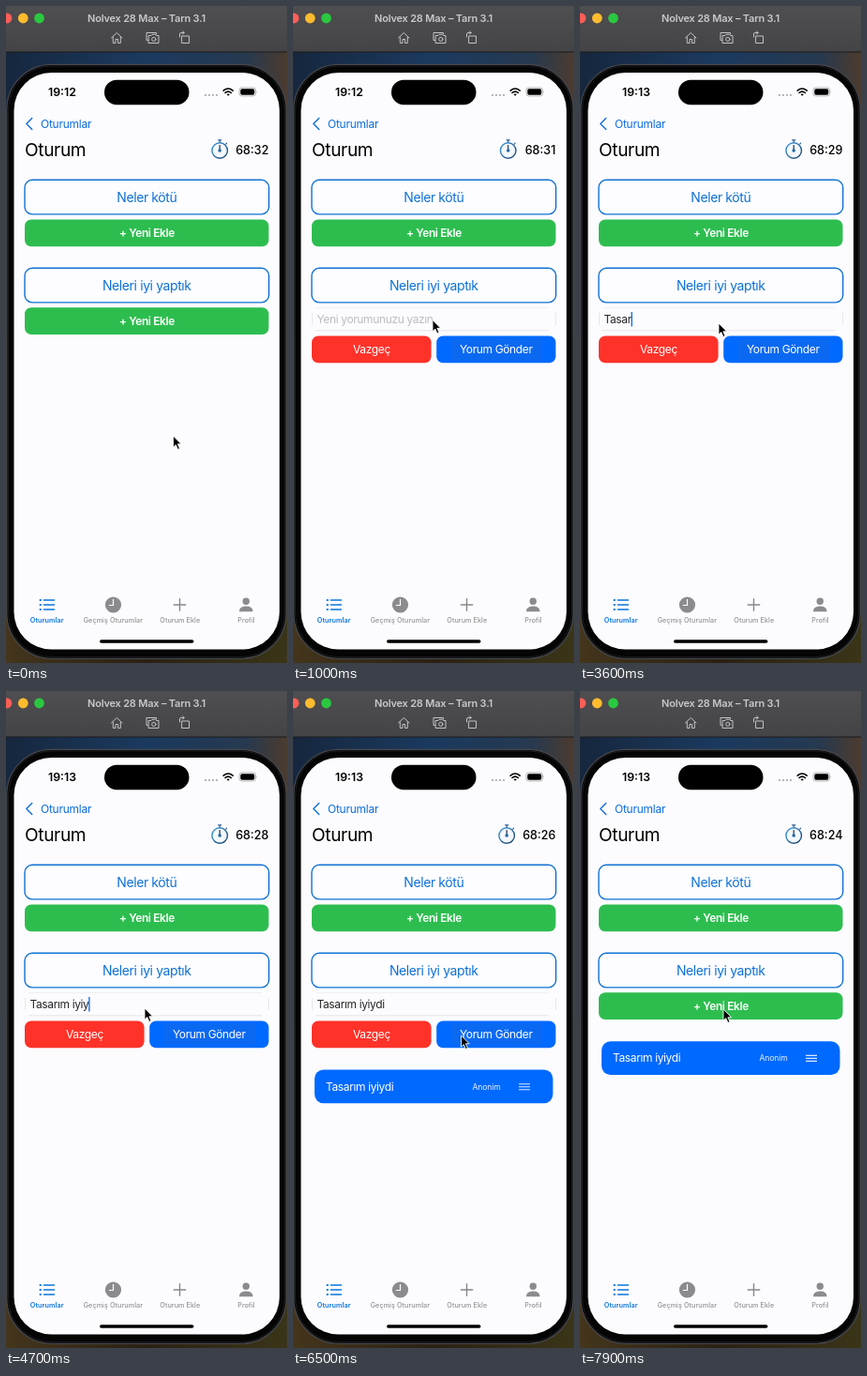
Write an HTML page that moves like this. It is 300 px wide and 700 px high and loops after 8000 ms.

```html
<!DOCTYPE html>
<html lang="tr">
<head>
<meta charset="utf-8">
<title>Oturum</title>
<style>
html, body { margin: 0; width: 100%; height: 100%; overflow: hidden; background: #0b1524; }
svg { display: block; width: 300px; height: 700px; }
text { font-family: Inter, Roboto, sans-serif; white-space: pre; }
.mid { text-anchor: middle; }
.body { font-size: 12px; letter-spacing: -.37px; }
.head { font-size: 14px; letter-spacing: -.4px; fill: #0d70d6; }
.add { font-size: 11.9px; font-weight: 600; letter-spacing: -.35px; fill: #fff; }
.tab { font-size: 7.2px; font-weight: 500; letter-spacing: .08px; fill: #929295; }
.line { fill: none; stroke-linecap: round; stroke-linejoin: round; }
</style>
</head>
<body>
<svg viewBox="0 0 300 700">
  <defs>
    <linearGradient id="bar" x2="0" y2="1">
      <stop offset="0" stop-color="#4f4e50"/>
      <stop offset="1" stop-color="#444346"/>
    </linearGradient>
    <linearGradient id="sky">
      <stop offset="0" stop-color="#16273e"/>
      <stop offset=".5" stop-color="#1b3a60"/>
      <stop offset=".85" stop-color="#26394f"/>
      <stop offset="1" stop-color="#4c3b2f"/>
    </linearGradient>
    <linearGradient id="ground">
      <stop offset="0" stop-color="#44351c"/>
      <stop offset=".5" stop-color="#2a2114"/>
      <stop offset="1" stop-color="#3a3518"/>
    </linearGradient>
    <linearGradient id="dial" x2="1" y2="1">
      <stop offset="0" stop-color="#3f9be0"/>
      <stop offset="1" stop-color="#173f66"/>
    </linearGradient>
    <g id="section">
      <rect x="20" y="185.3" width="260.7" height="36.6" rx="8" fill="#fdfdff" stroke="#1272d3" stroke-width="1.4"/>
    </g>
    <g id="add">
      <rect x="20" y="227.5" width="260.5" height="28.7" rx="7" fill="#2dbd4f"/>
      <text class="add mid" x="150.5" y="246.2">+ Yeni Ekle</text>
    </g>
  </defs>

  <rect width="300" height="350" fill="url(#sky)"/>
  <rect y="350" width="300" height="350" fill="url(#ground)"/>

  <!-- window bar -->
  <rect width="300" height="49" fill="url(#bar)"/>
  <rect y="48.5" width="300" height="1" fill="#1a1a1d"/>
  <circle cx="1" cy="13" r="5.4" fill="#fe5f57"/>
  <circle cx="18.3" cy="13" r="5.4" fill="#febb2e"/>
  <circle cx="35.5" cy="13" r="5.4" fill="#2ac840"/>
  <text class="mid" x="150" y="17" font-size="11" font-weight="600" letter-spacing="-.2" fill="#c9c8cb">Nolvex 28 Max – Tarn 3.1</text>
  <g class="line" stroke="#c2c1c4" stroke-width="1">
    <path d="M112.5 34L118.3 28.5L124 34M114.3 33V39.5H117V35.5H119.6V39.5H122.3V33"/>
    <path d="M151.5 36.5H150V28.5H160.5V30"/>
    <path d="M152.5 31.5H155L156 30.3H159.5L160.5 31.5H163V39.5H152.5Z"/>
    <circle cx="157.8" cy="35.4" r="2.1"/>
    <path d="M188 32H195.5V39.5H188ZM185.5 33V30Q185.5 28.5 187 28.5H190M188.5 26.8L190.2 28.5L188.5 30.2"/>
  </g>

  <!-- device -->
  <rect x=".8" y="62.3" width="298.4" height="633" rx="48" fill="#050506" stroke="#46474b" stroke-width="1.3"/>
  <rect x="2.6" y="64" width="294.8" height="629.6" rx="46" fill="none" stroke="#1c1c1f"/>
  <rect x="8.5" y="71" width="283.5" height="614.6" rx="40" fill="#fcfcff"/>
  <rect x="105" y="78.7" width="90.5" height="26.5" rx="13.2"/>
  <text id="clock" x="45" y="96" font-size="12.3" font-weight="600"></text>
  <g fill="#a5a5a8">
    <circle cx="213" cy="95" r="1.1"/><circle cx="217" cy="95" r="1.1"/>
    <circle cx="221" cy="95" r="1.1"/><circle cx="225" cy="95" r="1.1"/>
  </g>
  <path class="line" d="M232.2 90.2Q237.2 85.8 242.2 90.2M234 92.5Q237.2 89.8 240.4 92.5" stroke="#000" stroke-width="1.6"/>
  <path d="M235.5 94.1Q237.2 92.8 238.9 94.1L237.2 95.8Z"/>
  <rect x="249" y="87" width="17.6" height="9" rx="2.8" fill="none" stroke="#a2a2a5" stroke-width=".8"/>
  <rect x="250.3" y="88.3" width="15" height="6.4" rx="1.7"/>
  <path d="M267.6 90V93Q268.8 91.5 267.6 90Z" fill="#a2a2a5"/>

  <!-- navigation -->
  <path class="line" d="M27.8 119.5L21.8 125.5L27.8 131.5" stroke="#0a6cdc" stroke-width="1.3"/>
  <text x="37" y="130" font-size="12" letter-spacing="-.25" fill="#0a6cdc">Oturumlar</text>
  <text x="20" y="160.3" font-size="19.2" letter-spacing="-.4">Oturum</text>
  <g id="watch">
    <g class="line">
      <circle cx="228.2" cy="154" r="8.3" fill="#f3f8fd" stroke="url(#dial)" stroke-width="1.4"/>
      <path d="M228.2 145V143M226.6 142.8H229.8M234.8 147L235.6 146.2" stroke="#2a5f8f" stroke-width="1.2"/>
      <path d="M228.2 153.5V148.5" stroke="#1d3146" stroke-width="1.2"/>
    </g>
    <circle cx="228.2" cy="154" r="1.8" fill="#2469a3"/>
  </g>
  <text id="timer" x="280.5" y="157.6" font-size="12.6" font-weight="500" text-anchor="end"></text>

  <!-- sections -->
  <use href="#section"/>
  <text class="head mid" x="150.3" y="209">Neler kötü</text>
  <use href="#add"/>
  <use href="#section" y="94"/>
  <text class="head mid" x="150.3" y="303">Neleri iyi yaptık</text>
  <use id="closed" href="#add" y="93.8"/>

  <g id="editor">
    <path d="M24 321.5H273" stroke="#f0f0f3"/>
    <path d="M24 345.8H273" stroke="#e5e5e8"/>
    <path d="M20.5 327V340M280.5 327V340" stroke="#e8e8eb"/>
    <text id="hint" class="body" x="25.5" y="338.2" fill="#bcbcc0">Yeni yorumunuzu yazın</text>
    <text id="typed" class="body" x="25.5" y="338.2" fill="#252527"></text>
    <rect id="caret" y="326" width="1.4" height="15.5" fill="#1a73e0"/>
    <rect x="20" y="351.5" width="127.6" height="28.7" rx="7" fill="#ff3229"/>
    <rect x="153.2" y="351.5" width="127.3" height="28.7" rx="7" fill="#0069ff"/>
    <rect x="169" y="354.5" width="97" height="23" rx="2" fill="#0b69f1"/>
    <text class="body mid" x="84" y="370.2" fill="#fff">Vazgeç</text>
    <text class="body mid" x="216.8" y="370.2" fill="#fff">Yorum Gönder</text>
  </g>

  <g id="card">
    <rect x="23" width="254.5" height="35.8" rx="9.5" fill="#0069ff"/>
    <text class="body" x="35" y="22.3" fill="#fff">Tasarım iyiydi</text>
    <text x="191.5" y="21" font-size="8.6" letter-spacing="-.1" fill="#eaf2ff">Anonim</text>
    <path d="M241 15.2H253M241 18.2H253M241 21.2H253" stroke="#d9e8ff" stroke-width="1.1"/>
  </g>

  <!-- tabs -->
  <g stroke="#0a76dc" stroke-width="1.5" class="line">
    <path d="M40.5 633H51.5M40.5 638H51.5M40.5 643H51.5"/>
    <path d="M36.5 633H37M36.5 638H37M36.5 643H37" stroke-width="2"/>
  </g>
  <circle cx="114.5" cy="638" r="8.6" fill="#8b8b8e"/>
  <path class="line" d="M114.5 632.3V638.5H110.3" stroke="#fcfcff" stroke-width="1.2"/>
  <path class="line" d="M179.3 638H191.7M185.5 631.8V644.2" stroke="#87878a" stroke-width="1.4"/>
  <circle cx="256.3" cy="634.2" r="3.7" fill="#8b8b8e"/>
  <path d="M249 645.3Q249 639.4 256.3 639.4T263.6 645.3Z" fill="#8b8b8e"/>
  <text class="tab mid" x="43.7" y="656.7" style="fill:#0a76dc;font-weight:600">Oturumlar</text>
  <text class="tab mid" x="114.4" y="656.7">Geçmiş Oturumlar</text>
  <text class="tab mid" x="185.8" y="656.7">Oturum Ekle</text>
  <text class="tab mid" x="256.5" y="656.7">Profil</text>
  <rect x="100" y="675.2" width="100.5" height="3.6" rx="1.8"/>

  <path id="pointer" d="M0 0V12.2L2.8 9.6L4.9 14.4L7 13.5L4.9 8.8H8.7Z" fill="#000" stroke="#fff" stroke-width=".9" stroke-linejoin="round"/>
</svg>
<script>
const LOOP = 8000, STEP = 100;
const OPEN = 800, FOCUS = 1800, MINUTE = 2900, SEND = 6100, CLOSE = 7300;
const TYPE_START = 3000, TYPE_GAP = 150;
const COMMENT = "Tasarım iyiydi";
// time, x, y
const PATH = [
  [0, 178.5, 458], [200, 178.5, 458], [700, 150, 335], [1000, 149, 334.5],
  [1500, 148, 338], [5300, 148, 338], [5800, 179.5, 367], [6600, 179.5, 367],
  [7000, 118, 365], [7300, 118, 365], [7700, 153, 339], [8000, 153, 339]
];
const el = id => document.getElementById(id);
const [clock, watch, timer, closed, editor, hint, typed, caret, card, pointer] =
  ["clock", "watch", "timer", "closed", "editor", "hint", "typed", "caret", "card", "pointer"].map(el);

const show = (node, on) => node.setAttribute("visibility", on ? "inherit" : "hidden");
const move = (node, x, y) => node.setAttribute("transform", `translate(${x} ${y})`);
const setText = (node, s) => { if (node.textContent !== s) node.textContent = s; };

function pointerAt(t) {
  const i = Math.max(1, PATH.findIndex(p => p[0] >= t));
  const [t0, x0, y0] = PATH[i - 1], [t1, x1, y1] = PATH[i];
  const u = (t - t0) / (t1 - t0), e = u * u * (3 - 2 * u);
  return [x0 + (x1 - x0) * e, y0 + (y1 - y0) * e];
}

function draw(t) {
  const left = 32 - Math.max(0, Math.floor((t - OPEN) / 1000) + 1);
  setText(clock, t < MINUTE ? "19:12" : "19:13");
  setText(timer, "68:" + left);
  // a narrow last digit lets the icon sit further right
  move(watch, left % 10 === 1 ? 1.5 : 0, 0);

  const open = t >= OPEN && t < CLOSE;
  show(editor, open);
  show(closed, !open);

  const count = Math.max(0, Math.min(COMMENT.length, Math.floor((t - TYPE_START) / TYPE_GAP) + 1));
  setText(typed, COMMENT.slice(0, count));
  show(hint, count === 0);

  const typing = count > 0 && count < COMMENT.length;
  const blink = (t - FOCUS) % 1000 < 600;
  const focused = open && t >= FOCUS && t < SEND;
  show(caret, focused && (typing || blink));
  caret.setAttribute("x", 25.2 + (count ? typed.getComputedTextLength() : 0));

  show(card, t >= SEND);
  move(card, 0, open ? 403.5 : 373.2);
  move(pointer, ...pointerAt(t));
}

const start = performance.now();
function tick() {
  const t = (performance.now() - start) % LOOP;
  draw(Math.floor(t / STEP) * STEP);
  requestAnimationFrame(tick);
}
tick();
</script>
</body>
</html>
```
